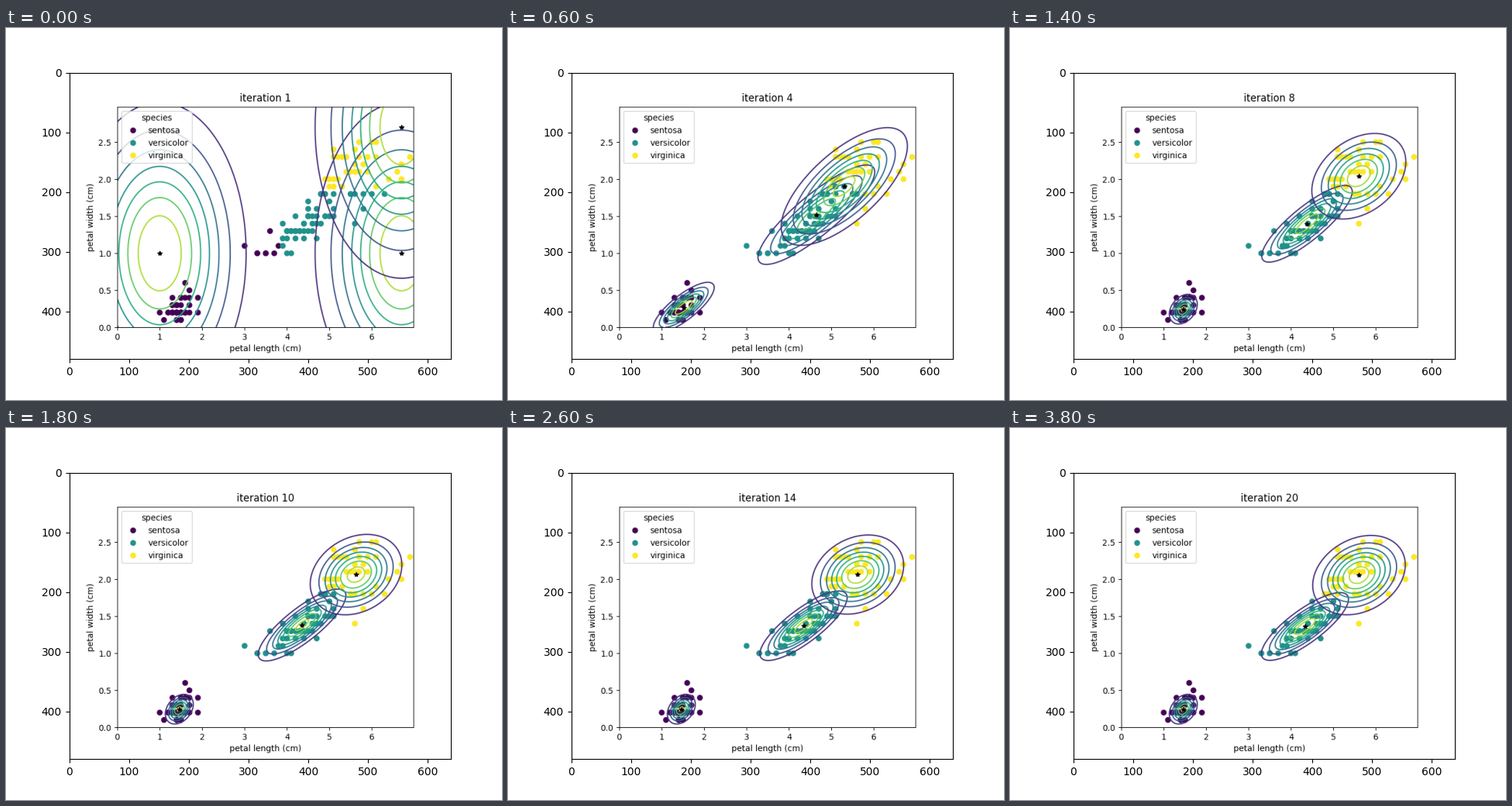
Animation of 640 by 480 pixels, one loop 4000 ms. Source, as a matplotlib script:

```python
"""Expectation-maximisation for a three-part Gaussian mixture on iris petals."""
import numpy as np
import matplotlib.pyplot as plt
from matplotlib.animation import FuncAnimation

STEPS = 20
INTERVAL = 200
NAMES = ["sentosa", "versicolor", "virginica"]

# Iris petals in mm: width -> lengths
SETOSA = {
    1: [11] + [14] * 2 + [15] * 2,
    2: [10] + [12] * 2 + [13] * 4 + [14] * 8 + [15] * 7 + [16] * 5 + [17, 19],
    3: [13] * 2 + [14] * 3 + [15, 17],
    4: [13] + [15] * 3 + [16, 17, 19],
    5: [17],
    6: [16],
}
VERSICOLOR = {
    10: [33, 33, 35, 35, 37, 40, 41],
    11: [30, 38, 39],
    12: [39, 40, 42, 44, 47],
    13: [36] + [40] * 3 + [41] * 2 + [42] * 2 + [43] * 2 + [44, 45, 46],
    14: [39, 44, 44, 46, 47, 47, 48],
    15: [42] + [45] * 5 + [46, 47, 49, 49],
    16: [45, 47, 51],
    17: [50],
    18: [48],
}
VIRGINICA = {
    14: [56],
    15: [50, 51],
    16: [58],
    17: [45],
    18: [48, 48, 49, 49, 51, 55, 55, 56, 58, 60, 63],
    19: [50, 51, 51, 53, 61],
    20: [49, 50, 51, 52, 64, 67],
    21: [54, 55, 56, 57, 59, 66],
    22: [56, 58, 67],
    23: [51, 52, 53, 54, 57, 59, 61, 69],
    24: [51, 56, 56],
    25: [57, 60, 61],
}

petals = np.array([(length, width)
                   for species in (SETOSA, VERSICOLOR, VIRGINICA)
                   for width, lengths in species.items()
                   for length in lengths]) / 10

xs, ys = np.meshgrid(np.arange(350) * 0.02, np.arange(150) * 0.02)
grid = np.stack([xs, ys], axis=-1)


def density(points, mean, cov):
    d = points - mean
    dist = np.einsum("...i,ij,...j->...", d, np.linalg.inv(cov), d)
    return np.exp(-dist / 2) / (2 * np.pi * np.sqrt(np.linalg.det(cov)))


def expect(weights, means, covs):
    joint = np.stack([w * density(petals, m, c)
                      for w, m, c in zip(weights, means, covs)], axis=1)
    return joint / joint.sum(axis=1, keepdims=True)


def maximise(resp):
    total = resp.sum(axis=0)
    means = resp.T @ petals / total[:, None]
    covs = []
    for r, mean, n in zip(resp.T, means, total):
        d = petals - mean
        covs.append((r[:, None] * d).T @ d / n)
    return total / len(petals), means, covs


def draw_plot(fig, step, means, covs, labels):
    fig.clear()
    ax = fig.add_subplot()
    dots = ax.scatter(*petals.T, c=labels, vmin=0, vmax=2)
    for mean, cov in zip(means, covs):
        ax.contour(xs, ys, density(grid, mean, cov))
    ax.plot(*np.transpose(means), "k*")
    ax.set(xlim=(0, xs.max()), ylim=(0, ys.max()),
           title=f"iteration {step}",
           xlabel="petal length (cm)", ylabel="petal width (cm)")
    ax.legend(dots.legend_elements()[0], NAMES, title="species",
              loc="upper left")


def snapshot(fig):
    fig.canvas.draw()
    return np.array(fig.canvas.buffer_rgba())[..., :3]


def run_em(fig):
    weights = np.full(3, 1 / 3)
    means = np.array([(1.0, 1.0), (6.7, 1.0), (6.7, 2.7)])
    covs = [np.eye(2)] * 3
    shots = []
    for step in range(1, STEPS + 1):
        resp = expect(weights, means, covs)
        draw_plot(fig, step, means, covs, resp.argmax(axis=1))
        shots.append(snapshot(fig))
        weights, means, covs = maximise(resp)
    return shots


fig = plt.figure(figsize=(6.4, 4.8), dpi=100)
shots = run_em(fig)

# The finished plots are shown as pictures inside a second set of axes
fig.clear()
picture = fig.add_subplot().imshow(shots[0])


def update(i):
    picture.set_data(shots[i])
    return [picture]


anim = FuncAnimation(fig, update, frames=STEPS, interval=INTERVAL,
                     repeat=True, repeat_delay=0)
plt.show()
```
